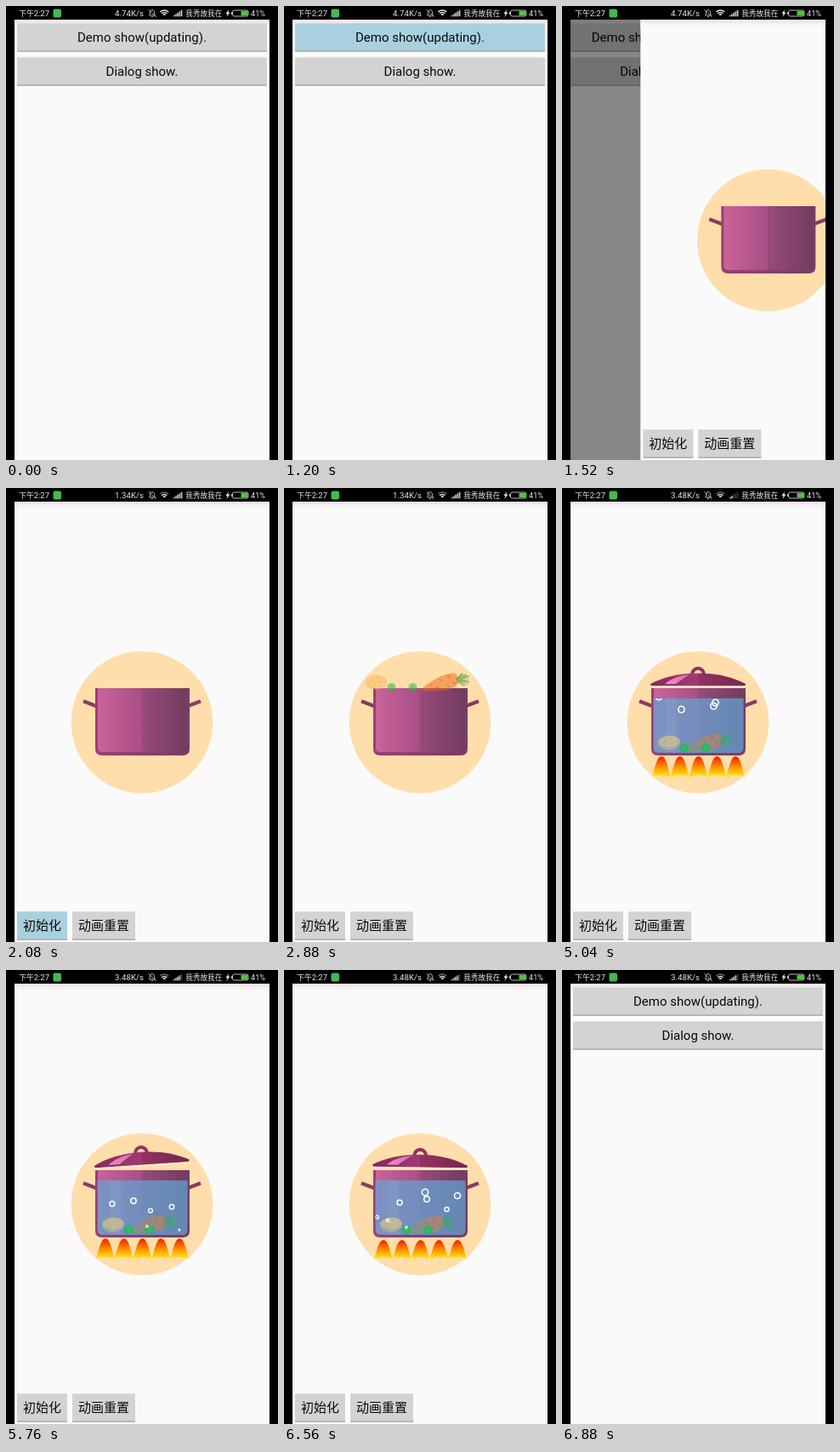
An HTML page with a canvas for the animation above (7680 ms loop, 320 by 533 pixels).

```html
<!DOCTYPE html>
<html lang="zh">
<head>
<meta charset="utf-8">
<title>Cooking pot</title>
<style>
html, body { margin: 0; width: 100%; height: 100%; overflow: hidden; background: #000; }
canvas { display: block; width: 100%; height: 100%; }
</style>
</head>
<body>
<canvas id="stage"></canvas>
<script>
const W = 320, H = 533, LOOP = 7680, STEP = 80, TAU = Math.PI * 2;
const LEFT = 10, TOP = 16, PAGE_W = 300;
const FONT = 'Roboto, "Noto Sans CJK SC", "Noto Sans CJK", sans-serif';
const canvas = document.getElementById('stage');
const ctx = canvas.getContext('2d');
const dpr = window.devicePixelRatio || 1;
canvas.width = W * dpr;
canvas.height = H * dpr;

const clamp = v => Math.max(0, Math.min(1, v));
const span = (t, from, len) => clamp((t - from) / len);
const easeOut = p => 1 - (1 - p) * (1 - p);

// [x, birth time]
const bubbles = [
  [114, 3820], [180.5, 3960], [178.5, 4040], [140.5, 4120],
  [150, 5060], [125, 5130], [195, 5200], [170, 5290],
  [166, 5660], [204, 5740], [168, 5820], [136, 5900],
  [191.5, 6060], [109.5, 6240], [122, 6320], [144, 6480]
];

function group(draw) {
  ctx.save();
  draw();
  ctx.restore();
}

function gradient(x0, y0, x1, y1, ...colors) {
  const g = ctx.createLinearGradient(x0, y0, x1, y1);
  colors.forEach((c, i) => g.addColorStop(i / (colors.length - 1), c));
  return g;
}

function rect(x, y, w, h, fill) {
  ctx.fillStyle = fill;
  ctx.fillRect(x, y, w, h);
}

function shape(d, fill) {
  ctx.fillStyle = fill;
  ctx.fill(new Path2D(d));
}

function line(d, color, width) {
  ctx.strokeStyle = color;
  ctx.lineWidth = width;
  ctx.stroke(new Path2D(d));
}

function ellipse(x, y, rx, ry, fill, turn = 0) {
  ctx.beginPath();
  ctx.ellipse(x, y, rx, ry, turn, 0, TAU);
  ctx.fillStyle = fill;
  ctx.fill();
}

function text(str, x, y, size, color, align = 'left') {
  ctx.font = `${size}px ${FONT}`;
  ctx.textAlign = align;
  ctx.fillStyle = color;
  ctx.fillText(str, x, y);
}

function button(label, x, y, w, pressed) {
  rect(x, y, w, 33, pressed ? '#a9d0de' : '#d3d3d3');
  rect(x, y, w, 1, pressed ? '#b9dce8' : '#dddddd');
  rect(x, y + 32.5, w, 1.3, '#a2a2a2');
  text(label, x + w / 2, y + 22.3, 15, '#0a0a0a', 'center');
}

function pageBase() {
  rect(LEFT, TOP, PAGE_W, H - TOP, '#fafafa');
  rect(LEFT, TOP, PAGE_W, 10, gradient(0, TOP, 0, TOP + 10, '#eadde4', '#f6f2f4', '#fafafa'));
}

function menuPage(t) {
  pageBase();
  button('Demo show(updating).', 13, 20, 294, t >= 1200 && t < 1360);
  button('Dialog show.', 13, 60, 294, false);
}

function potBody() {
  line('M91 250.3L106 256M229 250.3L214 256', '#8a3a64', 4.2);
  shape('M105 235H216V306Q216 314 208 314H113Q105 314 105 306Z', gradient(105, 0, 216, 0, '#9c3f72', '#7c3c60'));
  shape('M108 235H160V310H113Q108 310 108 305Z', gradient(108, 0, 160, 0, '#c9639b', '#a84f85'));
  shape('M160 235H213V305Q213 310 208 310H160Z', gradient(160, 0, 213, 0, '#984a79', '#713d60'));
}

function pea(x, y) {
  ellipse(x, y, 5, 5, '#1fb83c');
  line(`M${x - 3} ${y - 2}L${x + 3} ${y + 2}M${x} ${y - 4}V${y + 4}M${x - 3} ${y + 2}L${x + 3} ${y - 2}`, '#3fd05a', 0.7);
}

function potato() {
  ellipse(126, 299, 13, 8.5, '#efb45f', -0.05);
  ellipse(126, 297.5, 12.5, 6.5, '#fbcb78', -0.05);
  for (const [x, y] of [[121, 297], [128, 294], [131, 299], [124, 301]]) ellipse(x, y, 0.9, 0.7, '#d08b35');
}

function carrot() {
  line('M185 296L193 289M186 297L200 292M187 297L200 299M186 298L195 303M187 296L197 290', '#278f2c', 2.2);
  line('M187 296L190 289M190 297L200 296M190 298L198 302', '#3bae35', 1);
  shape('M143 308C151 301 164 291 179 288.5C186 287 189 293 187 300C184 307 174 309 162 309C154 309.5 147 310 143 308Z', '#ea6413');
  line('M165 295L169 299M175 290L178 295M161 304L166 307M174 302L178 306M181 299L185 301M154 302L157 305', '#b33a12', 1);
}

function foods(offset) {
  const dx = 24 * offset, dy = -97.3 * offset;
  group(() => {
    ctx.translate(-dx, dy);
    potato();
  });
  group(() => {
    ctx.translate(dx, dy);
    carrot();
  });
  group(() => {
    ctx.translate(-dx, dy);
    pea(144, 305);
    pea(169, 305);
  });
}

function lid(t) {
  const drop = span(t, 3200, 400);
  if (!drop) return;
  const tilt = t > 3840 ? -Math.sin(TAU * (t - 3840) / 600) * 4 * Math.PI / 180 : 0;
  const pivot = tilt > 0 ? 216 : 104;
  group(() => {
    ctx.globalAlpha = drop;
    ctx.translate(pivot, 232 - 30 * (1 - drop));
    ctx.rotate(tilt);
    ctx.translate(-pivot, -232);
    ctx.beginPath();
    ctx.arc(160, 218.5, 6.8, Math.PI * 0.9, Math.PI * 2.1);
    ctx.strokeStyle = '#8f3264';
    ctx.lineWidth = 4;
    ctx.stroke();
    shape('M104 230C119 222 138 217.5 160 217.5C182 217.5 201 222 216 230Q216 232.3 214 232.3H106Q104 232.3 104 230Z',
      gradient(104, 0, 216, 0, '#842a59', '#a03a72', '#7c2b53'));
    shape('M160 217.5C182 217.5 201 222 216 230Q216 232.3 214 232.3H160Z', 'rgba(100,25,65,.25)');
    shape('M121 230C128 224 138 220 150 219C146 222 139 226 134 230Z', gradient(121, 230, 150, 219, '#f48bcb', '#d869ab'));
    rect(104.5, 232.6, 111.5, 2, '#ffe9c8');
  });
}

function flames(t) {
  const grow = span(t, 3800, 320);
  if (!grow) return;
  const h = grow * (24 + Math.cos(TAU * (t - 5040) / 338));
  const top = 340 - h;
  const fill = gradient(0, top, 0, 340, '#f01c08', '#ff6a00', '#ffb400', '#fff02a');
  for (let i = 0; i < 5; i++) {
    const x = 117 + i * 21.8;
    shape(`M${x - 11} 339.5C${x - 7} ${340 - h * 0.6} ${x - 5} ${top} ${x} ${top}` +
      `C${x + 5} ${top} ${x + 7} ${340 - h * 0.6} ${x + 10.8} 339.5Q${x} ${340 - h * 0.22} ${x - 11} 339.5Z`, fill);
  }
}

function water(t) {
  const level = span(t, 3840, 480);
  if (!level) return;
  const top = 311 - 64 * level;
  group(() => {
    ctx.clip(new Path2D(`M107.5 ${top}H213.5V305Q213 311 208 311H113Q108 311 107.5 305Z`));
    rect(105, top, 111, 80, 'rgba(98,163,210,.73)');
    rect(122, top, 13, 80, 'rgba(255,255,255,.05)');
    group(() => {
      ctx.globalAlpha = 0.25;
      foods(0);
    });
    pea(144, 305);
    pea(169, 305);
    rect(139, 299, 36, 12, 'rgba(70,165,180,.3)');
    ctx.strokeStyle = '#fff';
    for (const [x, born] of bubbles) {
      const y = 306 - (t - born) * 0.05;
      if (y > 306 || y < 241) continue;
      const r = Math.min(3.7, 0.9 + (306 - y) * 0.065);
      ctx.lineWidth = Math.min(1.6, 0.9 + r * 0.2);
      ctx.beginPath();
      ctx.arc(x, y, r, 0, TAU);
      ctx.stroke();
    }
  });
}

function potPage(t) {
  pageBase();
  button('初始化', 13, 497, 59, t >= 2080 && t < 2240);
  button('动画重置', 78, 497, 74, false);
  ellipse(160, 275, 83.3, 83.3, '#ffdeab');
  flames(t);
  potBody();
  const fall = span(t, 2740, 520);
  if (fall) group(() => {
    ctx.globalAlpha = Math.min(1, fall / 0.54);
    foods(1 - fall);
  });
  water(t);
  lid(t);
}

function statusBar(t) {
  const speed = t < 2080 ? '4.74K/s' : t < 4480 ? '1.34K/s' : '3.48K/s';
  const bars = t < 3200 ? 4 : t < 5600 ? 1 : 3;
  const ink = '#e4e4e4';
  rect(0, 0, W, TOP, '#000');
  text('下午', 15, 12, 9, ink);
  text('2:27', 32.7, 12, 9.5, ink);
  ctx.beginPath();
  ctx.roundRect(55.5, 3.5, 9.5, 10, 2);
  ctx.fillStyle = '#45b854';
  ctx.fill();
  text(speed, 162, 12, 9.7, ink, 'right');

  line('M168.5 11H175.5L174.5 9V7Q174 4.5 172 4.5Q169.8 4.5 169.5 7V9ZM171 12.5H173M167.5 4L176.5 13', '#bdbdbd', 0.9);
  for (let i = 0; i < 3; i++) {
    ctx.beginPath();
    ctx.arc(186.3, 12, 2 + i * 2.5, Math.PI * 1.25, Math.PI * 1.75);
    ctx.strokeStyle = i === 2 && t >= 2080 ? '#666' : '#ddd';
    ctx.lineWidth = 1.5;
    ctx.stroke();
  }
  for (let i = 0; i < 5; i++) {
    const h = 1.5 + i * 1.5;
    rect(197 + i * 2.2, 12.3 - h, 1.6, h, i <= bars ? '#cfcfcf' : '#3c3c3c');
  }
  text('我秀故我在', 211.3, 12, 8.6, ink);
  shape('M262 4L258.5 9H260.5L259.5 13L263.5 7.6H261.3Z', ink);
  ctx.beginPath();
  ctx.roundRect(266.5, 5, 18.5, 7, 2);
  ctx.strokeStyle = '#bbb';
  ctx.lineWidth = 1;
  ctx.stroke();
  rect(265, 7, 1.5, 3, '#bbb');
  rect(276.5, 6, 8, 5, '#4fc83a');
  text('41%', 288, 12, 9.2, ink);
}

function render(t) {
  ctx.setTransform(canvas.width / W, 0, 0, canvas.height / H, 0, 0);
  rect(0, 0, W, H, '#000');
  // 0 shows the menu, 1 the pot page
  const shown = easeOut(span(t, 1320, 420)) - easeOut(span(t, 6570, 300));
  group(() => {
    ctx.beginPath();
    ctx.rect(LEFT, TOP, PAGE_W, H - TOP);
    ctx.clip();
    if (shown < 1) {
      group(() => {
        ctx.translate(-68 * shown, 0);
        menuPage(t);
        rect(LEFT + PAGE_W, TOP, 68, H - TOP, '#fafafa');
      });
      rect(LEFT, TOP, PAGE_W, H - TOP, `rgba(0,0,0,${0.64 * shown})`);
    }
    if (shown > 0) {
      ctx.translate(PAGE_W * (1 - shown), 0);
      potPage(t);
    }
  });
  statusBar(t);
}

const start = performance.now();
function tick() {
  const t = (performance.now() - start) % LOOP;
  render(Math.floor(t / STEP) * STEP);
  requestAnimationFrame(tick);
}
tick();
</script>
</body>
</html>
```
